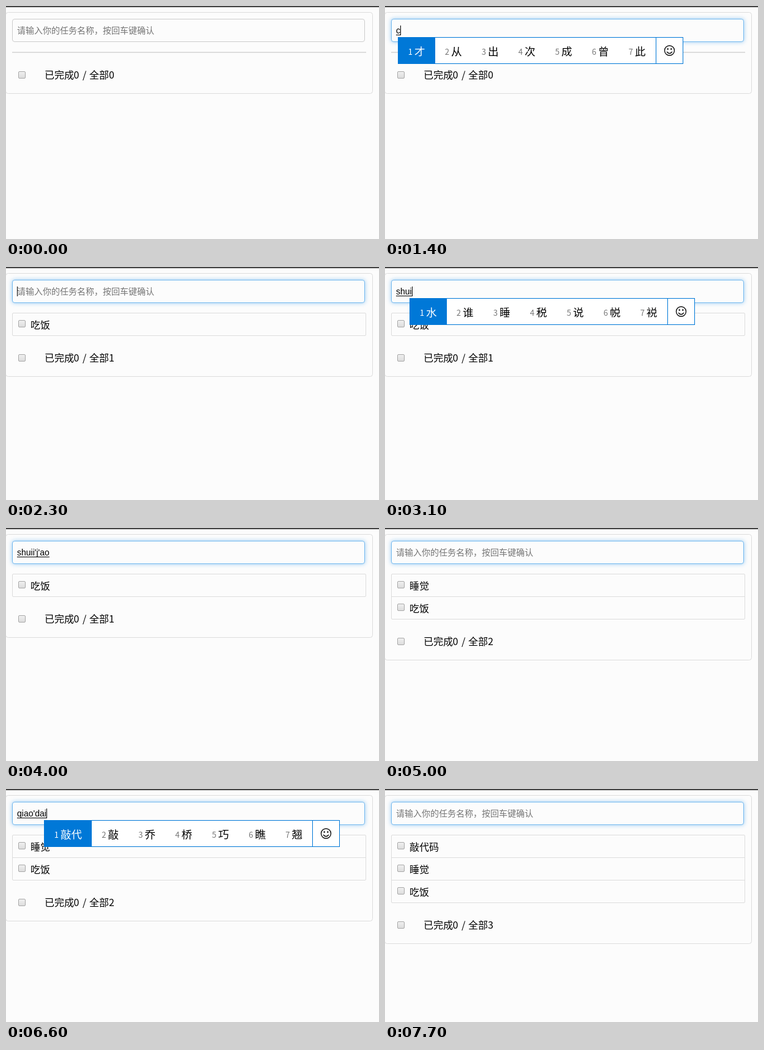
An HTML page that plays this animation: 609x382 px, repeating every 8 s.

```html
<!DOCTYPE html>
<html lang="zh-CN">
<head>
<meta charset="utf-8">
<style>
  html, body { margin: 0; width: 100%; height: 100%; overflow: hidden; background: #fcfcfc; }
  svg { display: block; }
  text { font: 16px "Noto Sans CJK SC", "Noto Sans CJK", sans-serif; white-space: pre; }
  .hint { font-size: 14px; fill: #757575; }
  .field { font: 14px "Liberation Sans", "Noto Sans CJK SC", "Noto Sans CJK", sans-serif; }
  .num { font-size: 13px; fill: #777; }
  .word { font: 17.5px "Noto Sans", "Noto Sans CJK SC", "Noto Sans CJK", sans-serif; }
  .num.on, .word.on { fill: #fff; }
</style>
</head>
<body>
<svg width="609" height="382" viewBox="0 0 609 382">
  <defs>
    <filter id="glow" filterUnits="userSpaceOnUse" x="-10" y="0" width="619" height="90">
      <feGaussianBlur stdDeviation="3.6"/>
    </filter>
    <linearGradient id="box" x2="0" y2="1">
      <stop stop-color="#f0f0f0"/><stop offset="1" stop-color="#dcdcdc"/>
    </linearGradient>
  </defs>
  <g id="scene"></g>
</svg>
<script>
const LOOP = 8000, BLUE = '#0078d7', LEFT = 18;
const TASKS = ['吃饭', '睡觉', '敲代码'];
const scene = document.getElementById('scene');
const pen = document.createElement('canvas').getContext('2d');
pen.font = '14px "Liberation Sans", "Noto Sans CJK SC", "Noto Sans CJK", sans-serif';

const face = { width: 148, parts: [[0, '('], [24, 'o=^•ェ•)o'], [118, '┏...']] };
const eat = ['吃饭', '吃烦', '吃', '迟', face, '持', '池'];
const words = s => s.split(' ');
const sleep = words('睡觉 水饺 水 谁 睡 税 说');
const go = words('去 请 其 前 却 七 钱');
const knock = words('敲 桥 巧 瞧 乔 悄 翘');

// [start, tasks, caret, text, candidates]; a missing text is an idle field
const steps = [
  [0, 0, 0],
  [600, 0, 1, ''],
  [1000, 0, 0, ''],
  [1400, 0, 1, 'c', words('才 从 出 次 成 曾 此')],
  [1500, 0, 1, 'ch', words('出 成 车 吃 处 长 场')],
  [1600, 0, 1, 'chi', words('吃 持 迟 池 尺 赤 翅')],
  [1700, 0, 1, "chi'f", eat],
  [1800, 0, 1, "chi'fa", words('吃法 持法 吃 迟 持 池 尺')],
  [1900, 0, 1, "chi'fan", eat],
  [2000, 0, 1, '吃饭'],
  [2300, 1, 1, ''],
  [2800, 1, 0, ''],
  [3000, 1, 1, 'sh', words('是 上 时 说 事 使 山')],
  [3100, 1, 1, 'shui', words('水 谁 睡 税 说 帨 裞')],
  [3400, 1, 1, "shuii'j", sleep],
  [3500, 1, 1, "shuii'j'ao", sleep],
  [4000, 1, 0, "shuii'j'ao", []],
  [4100, 1, 0, '睡觉'],
  [4200, 1, 1, '睡觉'],
  [4500, 2, 1, ''],
  [5000, 2, 0, ''],
  [5500, 2, 1, ''],
  [5900, 2, 1, 'q', go],
  [6000, 2, 1, 'qi', words('其 起 期 七 气 奇 齐')],
  [6100, 2, 1, 'qia', words('恰 卡 掐 洽 髂 袷 葜')],
  [6200, 2, 1, 'qiao', knock],
  [6300, 2, 1, "qiao'd", words('敲打 桥段 敲 桥 巧 瞧 乔')],
  [6400, 2, 1, "qiao'da", words('敲打 敲大 敲 乔 桥 巧 瞧')],
  [6600, 2, 1, "qiao'dai", words('敲代 敲 乔 桥 巧 瞧 翘')],
  [6800, 2, 1, "qiao'dai'm", words('敲代码 敲代 敲 乔 桥 巧 瞧')],
  [6900, 2, 1, "qiao'dai'ma", words('敲代码 敲代 敲 乔 桥 巧 瞧')],
  [7100, 2, 1, '敲代码'],
  [7200, 3, 1, ''],
  [7700, 3, 0, '']
];

const text = (x, y, s, cls = '') => `<text x="${x}" y="${y}" class="${cls}">${s}</text>`;
const fill = (x, y, w, h, color) => `<rect x="${x}" y="${y}" width="${w}" height="${h}" fill="${color}"/>`;
// One-pixel outline with outer edges on whole pixels
const frame = (x, y, w, h, r, stroke, paint = 'none') =>
  `<rect x="${x + .5}" y="${y + .5}" width="${w - 1}" height="${h - 1}" rx="${r}" stroke="${stroke}" fill="${paint}"/>`;
const checkbox = y => frame(20, y, 12, 12, 1.5, '#a9a9a9', 'url(#box)');

function panel(count) {
  const listHeight = count ? 1 + 37 * count : 2;
  const shift = listHeight - 2;
  let out = frame(-1, 10, 600, 134 + shift, 4, '#ddd');
  out += count ? frame(10, 75, 578, listHeight, 1.5, '#ddd') : fill(10, 75, 578, 2, '#ddd');
  TASKS.slice(0, count).reverse().forEach((task, i) => {
    const y = 75 + 37 * i;
    if (i) out += fill(11, y, 576, 1, '#ddd');
    out += checkbox(y + 12) + text(40, y + 25.5, task);
  });
  const y = 119 + shift;
  return out + checkbox(107 + shift) + text(63, y, '已完成') + text(110.5, y, '0') +
    text(125, y, '/') + text(136, y, '全部') + text(168, y, count);
}

function field(focused, value, caretX, caret, composing) {
  let out = '';
  if (focused) out += '<rect x="10" y="21" width="576" height="38" rx="4" fill="#52a8ec" opacity=".6" filter="url(#glow)"/>';
  out += frame(10, 21, 576, 38, 3.5, focused ? '#74b9ef' : '#ccc', '#fcfcfc');
  out += value ? text(LEFT, 45, value, 'field') : text(LEFT, 45, '请输入你的任务名称，按回车键确认', 'hint');
  if (composing) out += fill(LEFT, 47, caretX - LEFT, 1, '#000');
  if (caret) out += fill(caretX, 32, 1, 16, '#000');
  return out;
}

function smiley(x, y) {
  return `<g transform="translate(${x} ${y})" fill="none" stroke="#111" stroke-width="1.4">
    <circle r="8"/><path d="M-4.5 2Q0 7.5 4.5 2"/>
    <circle cx="-2.8" cy="-2.5" r=".6" fill="#111"/><circle cx="2.8" cy="-2.5" r=".6" fill="#111"/></g>`;
}

function popup(left, list) {
  let x = left, cells = '';
  list.forEach((item, i) => {
    const on = i ? '' : ' on';
    const width = 42.5 + (item.width || 17.5 * item.length);
    if (!i) cells += fill(x, 51, Math.ceil(width + .5), 44, BLUE);
    cells += text(x + 16.8, 79.5, i + 1, 'num' + on);
    for (const [dx, s] of item.parts || [[0, item]]) cells += text(x + 27 + dx, 80.5, s, 'word' + on);
    x += width;
  });
  const edge = Math.round(x + .6);
  return frame(left, 51, edge + 45 - left, 44, 0, BLUE, '#fff') + cells +
    fill(edge, 51, 1, 44, BLUE) + smiley(edge + 22.5, 73);
}

function draw([, count, caret, value, list]) {
  const caretX = Math.round(LEFT + pen.measureText(value || '').width);
  scene.innerHTML = fill(0, 0, 609, 2, '#444') + panel(count) +
    field(value !== undefined, value, caretX, caret, list) +
    (list && list.length ? popup(caretX - 4, list) : '');
}

let shown;
function tick() {
  const t = performance.now() % LOOP;
  const step = steps.findLast(s => s[0] <= t);
  if (step !== shown) draw(shown = step);
  requestAnimationFrame(tick);
}
tick();
</script>
</body>
</html>
```
